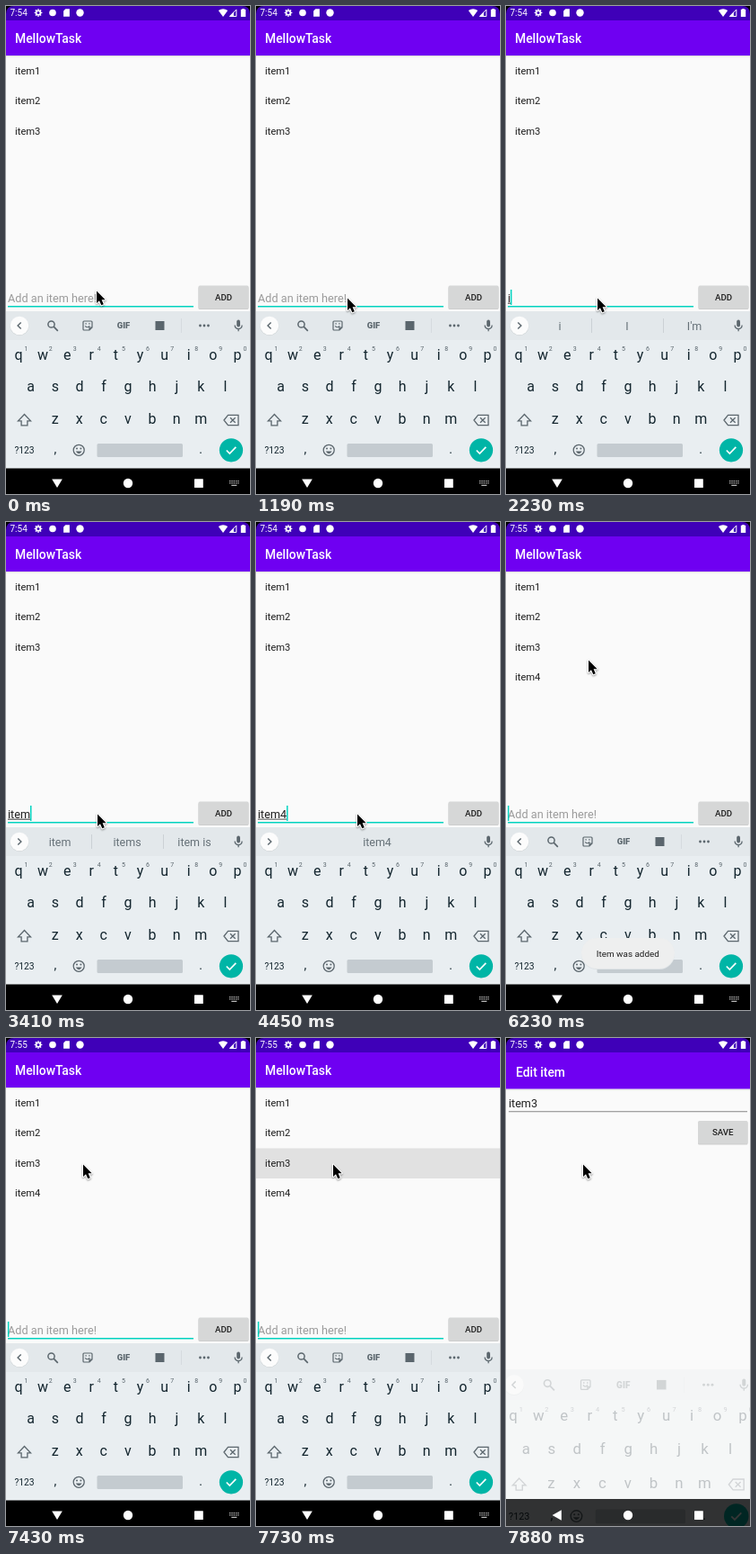
These frames come from a looping animation (272 px wide and 542 px high, 8000 ms). An HTML page with a canvas:

```html
<!DOCTYPE html>
<html lang="en">
<head>
<meta charset="utf-8">
<title>To-do list</title>
<style>
html, body { margin: 0; width: 100%; height: 100%; overflow: hidden; background: #fafafa; }
canvas { display: block; width: 272px; height: 542px; }
</style>
</head>
<body>
<canvas id="stage"></canvas>
<script>
const W = 272, H = 542, LOOP = 8000;
const canvas = document.getElementById('stage');
const c = canvas.getContext('2d');
const dpr = window.devicePixelRatio || 1;
canvas.width = W * dpr;
canvas.height = H * dpr;

const INK = '#14262f', ICON = '#5b666d', TEAL = '#03d3c0';
const BAR = '#6f00f2', STATUS = '#3f00b8', PAPER = '#fafafa';

// Each track: [start ms, value...], held until the next entry.
const POINTER = [
  [0, 100, 315], [1050, 101, 319], [1190, 101, 323], [4450, 112, 323],
  [4590, 150, 321], [4740, 205, 318], [4890, 233, 317], [5480, 231, 314],
  [5630, 220, 288], [5780, 182, 230], [5930, 130, 182], [6080, 98, 158],
  [6230, 91, 152], [6380, 89, 144], [6680, 87, 141], [7130, 85, 139]
];
const TYPED = [[0, ''], [2230, 'i'], [2520, 'it'], [3260, 'ite'], [3410, 'item'], [4300, 'item4'], [5040, '']];
const HINTS = [
  [0], [2230, 'i', 'I', "I'm"], [2520, 'it', "it's", 'is'], [3260, 'ite', 'item', 'items'],
  [3410, 'item', 'items', 'item is'], [4300, '', 'item4', ''], [5330]
];
const CARET = [
  [0, 0], [450, 1], [1050, 0], [1490, 1], [1930, 0], [2230, 1], [2970, 0], [3260, 1],
  [3850, 0], [4300, 1], [5630, 0], [6080, 1], [6530, 0], [7130, 1]
];
const TOAST = [[0, 0], [5330, 0.5], [5480, 1], [7130, 0.5], [7280, 0]];

function at(track, t) {
  let found = track[0];
  for (const key of track) if (key[0] <= t) found = key;
  return found.slice(1);
}

function rect(x, y, w, h, fill, r = 0) {
  c.fillStyle = fill;
  c.beginPath();
  c.roundRect(x, y, w, h, r);
  c.fill();
}

function disc(x, y, r, fill) {
  c.fillStyle = fill;
  c.beginPath();
  c.arc(x, y, r, 0, Math.PI * 2);
  c.fill();
}

function text(s, x, y, size, fill, align = 'left', weight = 400) {
  c.font = `${weight} ${size}px Roboto, sans-serif`;
  c.textAlign = align;
  c.fillStyle = fill;
  c.fillText(s, x, y);
}

// Path data is relative to the icon centre.
function icon(d, x, y, color, width = 0) {
  c.save();
  c.translate(x, y);
  const p = new Path2D(d);
  if (width) {
    c.strokeStyle = color;
    c.lineWidth = width;
    c.stroke(p);
  } else {
    c.fillStyle = color;
    c.fill(p);
  }
  c.restore();
}

function ring(x, y, r, color, width) {
  c.strokeStyle = color;
  c.lineWidth = width;
  c.beginPath();
  c.arc(x, y, r, 0, Math.PI * 2);
  c.stroke();
}

function statusBar(clock) {
  rect(0, 0, W, 16, STATUS);
  text(clock, 4.5, 11, 10, '#fff');
  ring(36, 7.5, 2.4, '#fff', 1.8);
  for (let i = 0; i < 8; i++) {
    const a = i * Math.PI / 4;
    disc(36 + 3.7 * Math.cos(a), 7.5 + 3.7 * Math.sin(a), 0.8, '#fff');
  }
  disc(52, 7.5, 3.8, '#fff');
  icon('M-1.2-4.2H3.4V4.2H-3.4V-2Z', 67.5, 7.5, '#fff');
  disc(82.5, 7.5, 4.2, '#fff');
  icon('M-5.2-2.4Q0-6 5.2-2.4L0 4.4Z', 242, 7.5, '#fff');
  icon('M3.8-3.6V4H-3.6Z', 253, 7.5, '#fff', 1);
  icon('M.8-.8V4H-4Z', 253, 7.5, '#fff');
  icon('M-1.2-4.6H1.2V-3.7H2.7V4.5H-2.7V-3.7H-1.2Z', 264.5, 7.5, '#fff');
}

function appBar(title, x, bottom, base) {
  rect(0, bottom, W, 1, 'rgba(0,0,0,.1)');
  rect(0, bottom + 1, W, 1, 'rgba(0,0,0,.03)');
  rect(0, 16, W, bottom - 16, BAR);
  text(title, x, base, 13.9, '#fff', 'left', 500);
}

function button(label, x, y, w, fill = '#d6d7d7') {
  rect(x, y + 1, w, 25.5, 'rgba(0,0,0,.18)', 1.5);
  rect(x, y, w, 25.5, fill, 1.5);
  text(label, x + w / 2, y + 16.2, 9.7, '#202020', 'center', 500);
}

function toolbar(words) {
  rect(0, 339, W, 32, '#e3e8eb');
  disc(15, 355.7, 10.5, 'rgba(0,0,0,.08)');
  disc(15, 355, 10.3, '#fcfcfc');
  icon(words.length ? 'M-1.7-3.6L1.9 0L-1.7 3.6' : 'M1.7-3.6L-1.9 0L1.7 3.6', 15, 355, ICON, 1.4);
  if (words.length) {
    words.forEach((w, i) => text(w, 60 + 75 * i, 360, 12.5, '#667178', 'center'));
    if (words[0]) for (const x of [95, 175]) rect(x, 347, 1, 16, '#cbd1d5');
  } else {
    ring(50.5, 353.5, 3.6, ICON, 1.5);
    icon('M1.2 1.2L5.8 5.8', 52, 355, ICON, 1.7);
    icon('M-4-5H4Q5-5 5-4V2L2 5H-4Q-5 5-5 4V-4Q-5-5-4-5ZM2 5V2H5M-2.7 .3Q-.5 3.2 2.2 .3', 91, 355, ICON, 1.2);
    rect(88.4, 352.2, 1.4, 1.4, ICON);
    rect(92.2, 352.2, 1.4, 1.4, ICON);
    text('GIF', 131, 358.4, 9.5, ICON, 'center', 900);
    rect(166.5, 350, 10, 10, ICON);
    rect(195, 347, 1, 16, '#d5dade');
    for (let i = -1; i < 2; i++) disc(221 + i * 4.5, 355, 1.4, ICON);
  }
  rect(257.2, 348.6, 3.8, 7.8, ICON, 1.9);
  icon('M-4-.5C-4 5 4 5 4-.5M0 3.5V6.3', 259.1, 355, ICON, 1.3);
}

function keyRow(keys, x, base) {
  [...keys].forEach((k, i) => text(k, x + 27.1 * i, base, 16, INK, 'center'));
}

function keyboard(words) {
  rect(0, 339, W, 205, '#e9eef1');
  toolbar(words);
  keyRow('qwertyuiop', 14, 393);
  [...'1234567890'].forEach((n, i) => text(n, 22.5 + 27.1 * i, 383, 7, '#59656c', 'center'));
  keyRow('asdfghjkl', 27.7, 428);
  keyRow('zxcvbnm', 54.6, 464);
  icon('M0-6.5L7 .8H3.4V5.8H-3.4V.8H-7Z', 20.5, 460, ICON, 1.3);
  icon('M-8 0L-3.5-5.6H8V5.6H-3.5ZM-1-2.7L4.6 2.7M4.6-2.7L-1 2.7', 251, 460, ICON, 1.3);
  text('?123', 20.5, 497, 10.3, INK, 'center');
  text(',', 55, 497, 14, INK, 'center');
  ring(81.2, 493.3, 6, ICON, 1.3);
  disc(79, 491.6, 1, ICON);
  disc(83.4, 491.6, 1, ICON);
  icon('M-3.5 1.2H3.5Q0 6.5-3.5 1.2Z', 81.2, 493.3, ICON);
  rect(101.5, 486, 95.5, 15, '#c4cbd0', 1.5);
  text('.', 217, 497, 14, INK, 'center');
  disc(251, 493.3, 13.1, '#00b5a6');
  icon('M-5.2.2L-1.7 3.7L5.3-3.5', 251, 493.3, '#fff', 1.7);
}

function navIcons(back) {
  icon(back, 57, 530, '#fff');
  disc(136, 530, 5.2, '#fff');
  rect(210, 525.3, 9.8, 9.8, '#fff', 0.5);
}

function toast(alpha) {
  if (!alpha) return;
  c.save();
  c.globalAlpha = alpha;
  rect(84, 462.5, 104, 34.5, '#dfe4e7', 17);
  rect(84, 462, 104, 34, '#eeefef', 17);
  text('Item was added', 135.8, 483, 9.9, '#1d1d1d', 'center');
  c.restore();
}

function pointer(x, y) {
  c.save();
  c.translate(x, y);
  c.lineJoin = 'round';
  c.shadowColor = 'rgba(0,0,0,.4)';
  c.shadowBlur = 2 * dpr;
  c.shadowOffsetY = dpr;
  const p = new Path2D('M1 1.5V15L4 12.2L6.3 17.3L8.8 16.2L6.6 11.3H10.7Z');
  c.strokeStyle = '#fff';
  c.lineWidth = 2.2;
  c.stroke(p);
  c.shadowColor = 'transparent';
  c.fillStyle = '#000';
  c.fill(p);
  c.restore();
}

function listScreen(t) {
  const added = t >= 5180;
  appBar('MellowTask', 10, 55, 41);
  statusBar(added ? '7:55' : '7:54');
  if (t >= 7730) rect(0, 122.5, W, 33.5, 'rgba(0,0,0,.1)');
  for (let i = 0; i < (added ? 4 : 3); i++) {
    text('item' + (i + 1), 10, Math.floor(76 + 33.5 * i), 11.2, '#212121');
  }

  const [typed] = at(TYPED, t);
  if (typed) text(typed, 2, 328.5, 12.7, '#212121');
  else text('Add an item here!', 2, 328.5, 12.7, '#9b9b9b');
  c.font = '400 12.7px Roboto, sans-serif';
  const end = c.measureText(typed).width;
  if (typed) rect(2, 329.7, end, 0.9, '#212121');
  if (at(CARET, t)[0]) rect(1.9 + end, 315, 1.5, 17, TEAL);
  rect(2, 333, 207, 1.5, TEAL);
  button('ADD', 214.5, 310.5, 56, t >= 5040 && t < 5330 ? '#b7b8b8' : undefined);

  keyboard(at(HINTS, t));
  toast(at(TOAST, t)[0]);
  rect(0, 513.5, W, 29, '#000');
  navIcons('M-5.8-4.6H5.8L0 5Z');
  for (let i = 0; i < 5; i++) {
    rect(249 + i * 2.3, 527, 1.4, 1.3, '#bbb');
    rect(249 + i * 2.3, 529.3, 1.4, 1.3, '#bbb');
  }
  rect(251.3, 531.8, 6, 1.2, '#bbb');
}

function editScreen() {
  appBar('Edit item', 11, 56.5, 42.5);
  statusBar('7:55');
  text('item3', 3, 76.8, 12.6, '#212121');
  rect(3, 81.3, 266, 1, '#858585');
  button('SAVE', 214, 92, 55.5);
  // The keyboard leaves enlarged and mostly faded, dark behind the navigation bar.
  c.save();
  c.translate(136, 420);
  c.scale(1.05, 1.055);
  c.translate(-136, -388);
  keyboard([]);
  c.restore();
  c.fillStyle = 'rgba(250,250,250,.75)';
  c.fillRect(0, 367, W, 145);
  c.fillStyle = 'rgba(0,0,0,.79)';
  c.fillRect(0, 512, W, 30);
  navIcons('M4.8-5.8V5.8L-5.4 0Z');
}

// Black rounded corners of the device screen.
function corners() {
  icon('M0 0H9Q0 0 0 9Z', 0, 0, '#000');
  icon('M0 0H-9Q0 0 0 9Z', W, 0, '#000');
}

function draw(now) {
  const t = now % LOOP;
  c.setTransform(dpr, 0, 0, dpr, 0, 0);
  rect(0, 0, W, H, PAPER);
  if (t >= 7880) editScreen();
  else listScreen(t);
  corners();
  pointer(...at(POINTER, t));
}

const start = performance.now();
function tick() {
  draw(performance.now() - start);
  requestAnimationFrame(tick);
}
tick();
</script>
</body>
</html>
```
